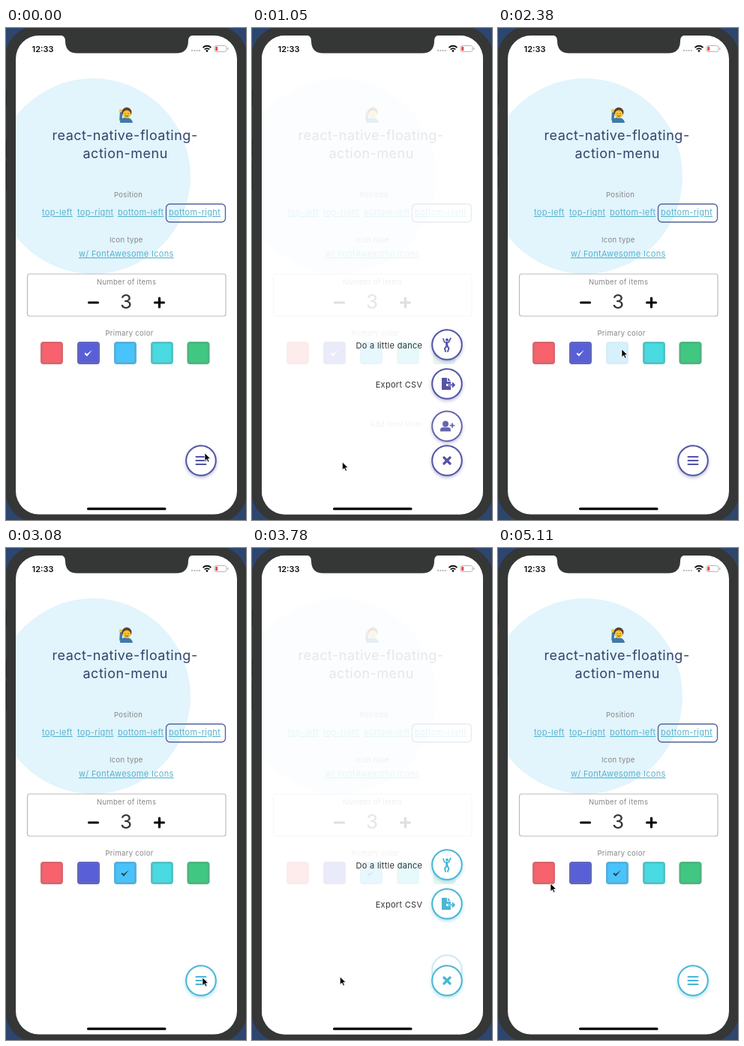
These frames come from a looping animation (320 by 654 pixels, 5.18 s). An HTML page:

```html
<!DOCTYPE html>
<html lang="en">
<head>
<meta charset="utf-8">
<title>Floating action menu</title>
<style>
  html, body { margin: 0; width: 100%; height: 100%; overflow: hidden; background: #2d466f; }
  svg { display: block; width: 100vw; height: 100vh; font-family: Inter, "Open Sans", sans-serif; }
  text { letter-spacing: .3px; }
  .title { font-size: 18px; letter-spacing: .5px; fill: #34436a; }
  .caption { font-size: 9.5px; fill: #858585; }
  .link { font-size: 11px; fill: #55b3cd; text-decoration: underline; }
  .label { font-size: 11px; fill: #333; text-anchor: end; }
  .count { font-size: 26px; letter-spacing: 0; fill: #333; text-anchor: middle; }
  .clock { font-size: 11px; font-weight: 600; letter-spacing: 0; fill: #111; }
  .thick { stroke: #050505; stroke-width: 3.2; stroke-linecap: round; }
  .ring { fill: #fff; stroke: var(--primary); stroke-width: 2; filter: drop-shadow(0 2px 2px var(--shade)); }
  .icon { fill: var(--primary); }
  .line { fill: none; stroke: var(--primary); stroke-linecap: round; stroke-linejoin: round; }
</style>
</head>
<body>
<svg viewBox="0 0 320 654" preserveAspectRatio="none">
  <defs>
    <clipPath id="screen"><rect x="13" y="10" width="295" height="636.5" rx="31"/></clipPath>
    <path id="tick" d="M-5 1 L-1.5 4.5 L5.5 -4 L-1.8 1.4 L-3.5 -.6 Z"/>
  </defs>

  <rect x="-1" y="-3" width="323" height="661" rx="43" fill="#353636"/>
  <path d="M0 82v21M0 148v24M0 177v38" stroke="#222" stroke-width="2"/>
  <rect x="13" y="10" width="295" height="636.5" rx="31" fill="#fff"/>

  <g clip-path="url(#screen)">
    <circle cx="116" cy="197" r="130" fill="#e2f4fc"/>

    <g id="emoji">
      <path d="M152 126 Q152 119 159.500 119 Q168 119 169 126 Z" fill="#3f79a8"/>
      <path d="M153 122 L153.500 113" stroke="#3f79a8" stroke-width="3.500" stroke-linecap="round"/>
      <circle cx="153" cy="110" r="2.300" fill="#fbc62f"/>
      <circle cx="161" cy="112" r="6.500" fill="#5d4030"/>
      <circle cx="161" cy="114.500" r="5.200" fill="#fbc62f"/>
      <path d="M158.800 116.500 q2.200 2 4.400 0" fill="none" stroke="#6b4423"/>
      <path d="M159 113.500v1M163 113.500v1" stroke="#4a3020"/>
    </g>
    <text class="title" x="61.500" y="149">react-native-floating-</text>
    <text class="title" x="102.500" y="173">action-menu</text>

    <text class="caption" x="144" y="225">Position</text>
    <text class="link" x="48" y="249">top-left</text>
    <text class="link" x="95" y="249">top-right</text>
    <text class="link" x="149" y="249">bottom-left</text>
    <text class="link" x="217" y="249">bottom-right</text>
    <rect x="213.500" y="234" width="79" height="24" rx="5" fill="none" stroke="#53659c" stroke-width="1.400"/>

    <text class="caption" x="138" y="284.500">Icon type</text>
    <text class="link" x="97" y="304">w/ FontAwesome Icons</text>

    <rect x="28.500" y="327" width="264.500" height="56" rx="3" fill="#fff" stroke="#bbb" stroke-width="1.200"/>
    <text class="caption" x="121" y="341">Number of items</text>
    <path class="thick" d="M110.500 365h12M198.500 365h12M204.500 359v12"/>
    <text class="count" x="160" y="373">3</text>

    <text class="caption" x="132.500" y="409">Primary color</text>
    <g id="swatches"></g>
    <use id="check" href="#tick"/>

    <rect id="veil" x="13" y="10" width="295" height="637" fill="#fff"/>
    <g id="items"></g>

    <g transform="translate(260 575)">
      <circle class="ring" r="19.800"/>
      <path id="bars" class="line" d="M-6.500 -5h13M-6.500 0h13M-6.500 5h13" stroke-width="2"/>
      <path id="cross" class="line" d="M-4 -4L4 4M4 -4L-4 4" stroke-width="3.200"/>
    </g>
  </g>

  <path d="M72 9.500 Q79 10 79 17 Q79 33.500 95 33.500 H227 Q243 33.500 243 17 Q243 10 250 9.500 Z" fill="#353636"/>
  <text class="clock" x="34.500" y="31.500">12:33</text>
  <path d="M247 30h12" stroke="#bbb" stroke-width="2" stroke-dasharray="2 1.300"/>
  <g fill="none" stroke="#111" stroke-width="1.700">
    <path d="M262.500 26 Q268 21.500 273.500 26M264.700 28.500 Q268 25.700 271.300 28.500"/>
    <circle cx="268" cy="30.500" r=".6"/>
  </g>
  <rect x="278" y="23.500" width="16" height="8" rx="2.300" fill="#fff" stroke="#b5b5b5"/>
  <rect x="279.300" y="24.800" width="3" height="5.400" rx="1" fill="#f0453f"/>
  <path d="M295.800 26v3" stroke="#b5b5b5" stroke-width="1.200"/>
  <rect x="108" y="637.500" width="105.500" height="3.300" rx="1.600" fill="#000"/>

  <path id="cursor" d="M0 0V10.500L2.500 8.200L4.300 12L6 11.200L4.300 7.600H7.700Z" fill="#000" stroke="#fff" stroke-width=".7"/>
</svg>

<script>
const LOOP = 5180, STEP = 70;
const GROW = 350, OPEN_GAP = 250, CLOSE_GAP = 24;
const VEIL = 0.87, HOME_Y = 575;
const PICK = 2450;
const cycles = [
  { open: 280, close: 1771 },
  { open: 3150, close: 4711 }
];
const themes = [
  { primary: '#5454a6', shade: '#5454a666' },
  { primary: '#4ab6d6', shade: '#4ab6d677' }
];
const swatchX = [46, 95, 144, 193, 241.5];
const swatchColors = ['#f8626c', '#595fd6', '#48c3fc', '#49dbe1', '#40c882'];

const menu = [
  { y: 421, text: 'Do a little dance', icon:
    '<circle class="icon" cx="0" cy="-6.500" r="1.900"/>' +
    '<path class="line" stroke-width="1.700" d="M-5 -8L-3.500 -3.500L2 -3L4.800 -8.500"/>' +
    '<path class="line" stroke-width="3" d="M-.5 -2.500L0 2"/>' +
    '<path class="line" stroke-width="2" d="M-.8 2L-3 5L-2 9M.7 2L2.500 5L1 9"/>' },
  { y: 473, text: 'Export CSV', icon:
    '<path class="icon" d="M-7 -8H0V-3H5V0H-1V3H5V8H-7ZM1 -8L5 -4H1Z"/>' +
    '<path class="line" stroke-width="1.800" d="M2 1.500H10M7.500 -1L10 1.500L7.500 4"/>' },
  { y: 524, text: 'Add new User', icon:
    '<circle class="icon" cx="-2" cy="-3" r="4"/>' +
    '<path class="icon" d="M-9 7V5Q-9 1.500 -5 1.500H1Q5 1.500 5 5V7Z"/>' +
    '<path class="line" stroke-width="1.800" d="M4.500 -1H9.500M7 -3.500V1.500"/>' }
];

// time, x, y of the pointer tip
const pointerPath = [
  [0, 265, 565], [210, 264, 567], [560, 143, 577], [1190, 118, 577], [1750, 128, 575],
  [1960, 130, 573], [2310, 165, 427], [2520, 165, 427], [2870, 262, 570],
  [3080, 262, 571], [3430, 209, 568], [3850, 112, 570], [4270, 85, 567],
  [4480, 81, 567], [4550, 71, 567], [4690, 71, 567], [5110, 70, 446]
];
const pressFade = [[2240, 1], [2345, 0.22], [2450, 0.22], [2590, 1]];

const get = id => document.getElementById(id);
const clamp = v => Math.min(1, Math.max(0, v));
const ease = x => x < 0.5 ? 2 * x * x : 1 - 2 * (1 - x) ** 2;

function sample(keys, t, column, curve = x => x) {
  const next = keys.findIndex(key => key[0] > t);
  if (next === 0) return keys[0][column];
  if (next < 0) return keys[keys.length - 1][column];
  const a = keys[next - 1], b = keys[next];
  return a[column] + (b[column] - a[column]) * curve((t - a[0]) / (b[0] - a[0]));
}

get('swatches').innerHTML = swatchColors.map((color, i) =>
  `<g><rect x="${swatchX[i]}" y="417" width="30" height="30" rx="4" fill="${color}"/>
   <rect x="${swatchX[i] + 1.5}" y="418.500" width="27" height="27" rx="3" fill="none"
     stroke="#777" stroke-opacity=".25" stroke-width="3"/></g>`).join('');

get('items').innerHTML = menu.map(item =>
  `<g><g><circle class="ring" r="19.800"/>${item.icon}</g>
   <text class="label">${item.text}</text></g>`).join('');

const swatches = [...get('swatches').children];
const items = [...get('items').children];

function progress(t, i) {
  const cycle = cycles.find(c => t >= c.open && t < c.close + 500);
  if (!cycle) return 0;
  const opened = ease(clamp((t - cycle.open - i * OPEN_GAP) / GROW));
  const closed = ease(clamp((t - cycle.close - (2 - i) * CLOSE_GAP) / GROW));
  return opened * (1 - closed);
}

function draw(t) {
  const picked = t >= PICK;
  const theme = themes[+picked];
  const root = document.documentElement.style;
  root.setProperty('--primary', theme.primary);
  root.setProperty('--shade', theme.shade);

  get('check').setAttribute('transform', `translate(${picked ? 158.5 : 109.5} 432)`);
  get('check').setAttribute('fill', picked ? '#27404f' : '#fff');
  swatches[2].setAttribute('opacity', sample(pressFade, t, 1));
  get('veil').setAttribute('opacity', VEIL * progress(t, 0));

  items.forEach((node, i) => {
    const p = progress(t, i), y = menu[i].y;
    const drop = (HOME_Y - y) * (1 - p);
    const [button, label] = node.children;
    const shown = clamp(1 - (1 - p) * 9);
    node.style.display = p > 0 ? '' : 'none';
    button.setAttribute('transform', `translate(260 ${y + drop})`);
    button.setAttribute('opacity', p);
    label.setAttribute('transform', `translate(${228 - shown * 0.7} ${y + 5 + drop * 0.15}) scale(${0.92 + 0.08 * shown})`);
    label.setAttribute('opacity', shown);
  });

  const open = cycles.some(c => t >= c.open && t < c.close);
  get('cross').style.display = open ? '' : 'none';
  get('bars').style.display = open ? 'none' : '';

  const x = sample(pointerPath, t, 1, ease), y = sample(pointerPath, t, 2, ease);
  get('cursor').setAttribute('transform', `translate(${x} ${y})`);
}

function tick() {
  const t = performance.now() % LOOP;
  draw(Math.floor(t / STEP) * STEP);
  requestAnimationFrame(tick);
}
tick();
</script>
</body>
</html>
```
